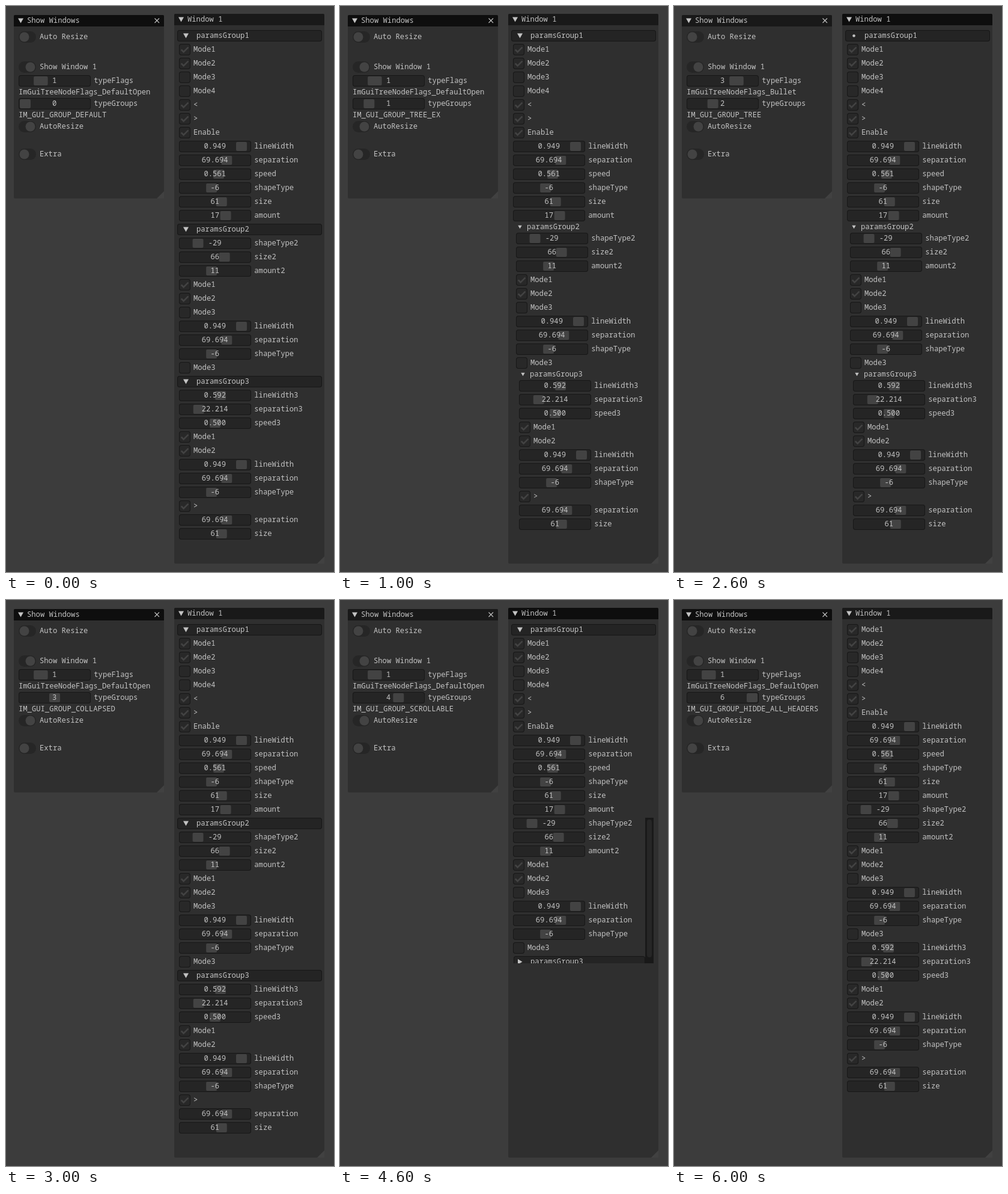
An HTML page with a canvas for the animation above (7000 ms loop, 546x941 px).

```html
<!DOCTYPE html>
<html lang="en">
<head>
<meta charset="utf-8">
<title>Window groups</title>
<style>
html, body { margin: 0; width: 100%; height: 100%; overflow: hidden; background: #3c3c3c; }
canvas { display: block; }
</style>
</head>
<body>
<canvas id="stage" width="546" height="941"></canvas>
<script>
const ctx = document.getElementById('stage').getContext('2d');
const TEXT = '#c3c3c3', FRAME = '#252525', EDGE = '#171717', GRAB = '#434343';
const TITLE = '#191919', TITLE_FOCUSED = '#0e0e0e';
const ROW = 23, TREE_ROW = 19, INDENT = 5;

const FLAGS = { 1: 'ImGuiTreeNodeFlags_DefaultOpen', 3: 'ImGuiTreeNodeFlags_Bullet' };
const TYPES = ['DEFAULT', 'TREE_EX', 'TREE', 'COLLAPSED', 'SCROLLABLE', 'ONLY_FIRST_HEADER', 'HIDDE_ALL_HEADERS'];

// label: [shown value, position along the track]
const SLIDERS = {
  lineWidth: ['0.949', .949], separation: ['69.694', .697], speed: ['0.561', .561],
  shapeType: ['-6', .44], size: ['61', .61], amount: ['17', .68],
  shapeType2: ['-29', .21], size2: ['66', .66], amount2: ['11', .44],
  lineWidth3: ['0.592', .592], separation3: ['22.214', .222], speed3: ['0.500', .5]
};

// "+" is a ticked box, "-" an empty one, anything else a slider
const GROUPS = [
  '+Mode1 +Mode2 -Mode3 -Mode4 +< +> +Enable lineWidth separation speed shapeType size amount',
  'shapeType2 size2 amount2 +Mode1 +Mode2 -Mode3 lineWidth separation shapeType -Mode3',
  'lineWidth3 separation3 speed3 +Mode1 +Mode2 lineWidth separation shapeType +> separation size'
].map(group => group.split(' '));

function text(string, x, cy, align = 'left') {
  ctx.fillStyle = TEXT;
  ctx.textAlign = align;
  ctx.fillText(string, x, cy + 4);
}

function rect(x, y, w, h, fill, radius = 0) {
  ctx.fillStyle = fill;
  ctx.beginPath();
  ctx.roundRect(x, y, w, h, radius);
  ctx.fill();
}

function frame(x, cy, w, fill = FRAME) {
  rect(x, cy - 9, w, 19, EDGE, 4);
  rect(x + 1, cy - 8, w - 2, 17, fill, 3);
}

function polygon(fill, ...points) {
  ctx.fillStyle = fill;
  ctx.beginPath();
  points.forEach(([x, y]) => ctx.lineTo(x, y));
  ctx.fill();
}

function line(color, width, ...points) {
  ctx.strokeStyle = color;
  ctx.lineWidth = width;
  ctx.beginPath();
  points.forEach(([x, y]) => ctx.lineTo(x, y));
  ctx.stroke();
}

function arrow(cx, cy, r = 4.5) {
  const h = r * .87, y = cy + .5;
  polygon(TEXT, [cx - r, y - h], [cx + r, y - h], [cx, y + h]);
}

function dot(cx, cy, r, fill) {
  ctx.fillStyle = fill;
  ctx.beginPath();
  ctx.arc(cx, cy, r, 0, 7);
  ctx.fill();
}

function panel(x, y, w, h, title, focused) {
  rect(x, y, w, h, '#2f2f2f', 2);
  rect(x, y, w, 19, focused ? TITLE_FOCUSED : TITLE, [2, 2, 0, 0]);
  const r = x + w, b = y + h;
  polygon('#414141', [r, b - 12], [r, b], [r - 12, b]);
  arrow(x + 11.5, y + 9);
  text(title, x + 22, y + 9);
}

function toggle(cy, label, on) {
  rect(21, cy - 9, 29, 19, '#262626', 9.5);
  dot(on ? 40.5 : 30.5, cy + .5, 8, GRAB);
  text(label, 56, cy);
}

function slider(x, cy, label, value, grabX, grabW = 18) {
  frame(x, cy, 120);
  rect(x + grabX, cy - 7, grabW, 15, GRAB, 2);
  text(value, x + 59.7, cy, 'center');
  text(label, x + 125.3, cy);
}

function checkbox(x, cy, label, on) {
  frame(x, cy, 19, '#282828');
  if (on) line(GRAB, 2.6, [x + 3.7, cy + .5], [x + 7.6, cy + 4.4], [x + 15.4, cy - 3.4]);
  text(label, x + 24, cy);
}

function header(cy, label, mark, x = 285, w = 241) {
  frame(x, cy, w, '#242424');
  if (mark === 'bullet') dot(299.5, cy + .5, 2.3, TEXT);
  else if (mark === 'closed') polygon(TEXT, [296, cy - 4], [303.5, cy + .5], [296, cy + 5]);
  else arrow(299.5, cy);
  text(label, 317, cy);
}

function rows(items, x, cy) {
  for (const item of items) {
    const label = item.slice(1);
    if (item[0] === '+' || item[0] === '-') checkbox(x, cy, label, item[0] === '+');
    else slider(x, cy, item, SLIDERS[item][0], 2 + SLIDERS[item][1] * 98);
    cy += ROW;
  }
  return cy;
}

function drawSettings(type, flag, focused) {
  panel(13, 15, 250, 305, 'Show Windows', focused);
  line(TEXT, 1.1, [247.5, 20.5], [255, 28]);
  line(TEXT, 1.1, [255, 20.5], [247.5, 28]);
  toggle(51, 'Auto Resize', false);
  toggle(101, 'Show Window 1', true);
  slider(21, 124, 'typeFlags', flag, 2 + flag * 23.1, 23.5);
  text(FLAGS[flag], 21, 143);
  slider(21, 162, 'typeGroups', type, 2 + type * 98 / 6);
  text('IM_GUI_GROUP_' + TYPES[type], 21, 181);
  toggle(200, 'AutoResize', true);
  toggle(246, 'Extra', false);
}

function drawScrollable(cy) {
  ctx.save();
  ctx.beginPath();
  ctx.rect(280, 362, 242, 242);
  ctx.clip();
  cy = rows(GROUPS[1], 288, cy);
  header(cy, 'paramsGroup3', 'closed', 289, 219);
  rect(508, 362, 14, 242, '#191919');
  rect(511, 365, 8, 229, '#262626', 4);
  ctx.restore();
}

function drawParams(type, flag, focused) {
  panel(280, 13, 250, 914, 'Window 1', focused);
  const name = TYPES[type], tree = name.startsWith('TREE');
  let x = 288, cy = 49;
  GROUPS.forEach((items, i) => {
    const label = 'paramsGroup' + (i + 1);
    if (i && name === 'SCROLLABLE') {
      if (i === 1) drawScrollable(cy);
      return;
    }
    if (i && tree) {
      cy += TREE_ROW - ROW;
      arrow(x + 11.5, cy, 3.2);
      text(label, x + 23, cy);
      cy += TREE_ROW;
      x += INDENT;
    } else if (name !== 'HIDDE_ALL_HEADERS' && !(i && name === 'ONLY_FIRST_HEADER')) {
      header(cy, label, flag === 3 ? 'bullet' : 'open');
      cy += ROW;
    }
    cy = rows(items, x, cy);
  });
}

function draw() {
  const type = Math.floor(performance.now() / 1000) % TYPES.length;
  const flag = type === 2 ? 3 : 1;
  const paramsFocused = type === 2 || type === 4;
  ctx.font = '12.2px "Noto Sans Mono", monospace';
  rect(0, 0, 546, 941, '#3c3c3c');
  drawSettings(type, flag, !paramsFocused);
  drawParams(type, flag, paramsFocused);
  requestAnimationFrame(draw);
}
draw();
</script>
</body>
</html>
```
